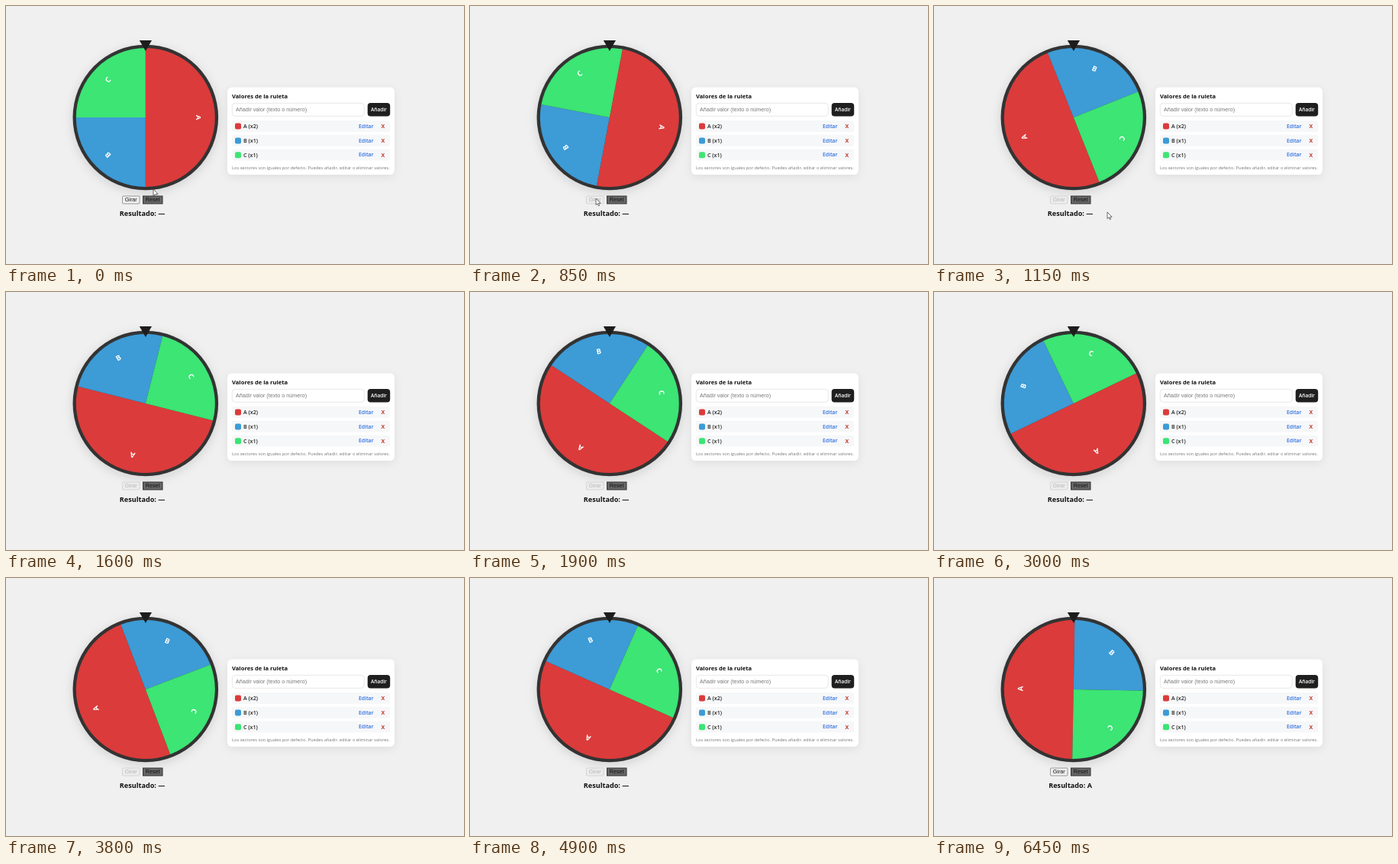
These frames come from a looping animation (600x338 px, 6.5 s). An HTML page:

```html
<!DOCTYPE html>
<html lang="es">
<head>
<meta charset="utf-8">
<title>Ruleta</title>
<style>
  html, body { margin: 0; width: 100%; height: 100%; overflow: hidden; background: #f0f0f0; }
  svg { display: block; width: 600px; height: 338px; }
  text { font-family: "Open Sans", "Noto Sans", sans-serif; fill: #111; }
  .ui { font-family: "Liberation Sans", Arial, sans-serif; font-size: 7.2px; }
  .mid { text-anchor: middle; }
  .bold { font-weight: 700; }
  .semi { font-weight: 600; }
  .label { font-size: 9.5px; fill: #fff; }
  .item { font-size: 7.1px; fill: #222; }
  .edit { font-size: 6.8px; fill: #2f6fe0; }
  .del { font-size: 7px; fill: #c0392b; }
  .disc { filter: drop-shadow(0 3px 7px rgba(0, 0, 0, .13)); }
  .card { filter: drop-shadow(0 3px 6px rgba(0, 0, 0, .07)); }
  .spin rect { fill: #efefef; stroke: #858585; }
  .spin.off rect { fill: #ececec; stroke: #cfcfcf; }
  .spin.off text { fill: #b4b4b4; }
</style>
</head>
<body>
<svg viewBox="0 0 600 338">
  <circle class="disc" cx="182.8" cy="146" r="95.3" fill="#333"/>
  <g transform="translate(182.8 146)"><g id="wheel"></g></g>
  <path d="M174.8 45H191L182.9 59Z" fill="#1d1d1d"/>

  <g class="spin" id="spin">
    <rect x="152.5" y="249" width="22.5" height="10" rx="1" stroke-width=".8"/>
    <text class="ui mid" x="163.7" y="256.4">Girar</text>
  </g>
  <rect x="179.5" y="249" width="25.5" height="10" fill="#666" stroke="#333"/>
  <text class="ui mid" x="192.2" y="256.4">Reset</text>
  <text id="result" class="bold mid" x="178.6" y="275" font-size="9.1"></text>

  <rect class="card" x="290" y="106.5" width="219" height="114.5" rx="6" fill="#fff"/>
  <text class="bold" x="296" y="121" font-size="7.6">Valores de la ruleta</text>
  <rect x="296.3" y="127.3" width="173" height="17" rx="4" fill="#fff" stroke="#ddd" stroke-width=".7"/>
  <text class="ui" x="301" y="138.3" style="fill:#777">Añadir valor (texto o número)</text>
  <rect x="473.7" y="127" width="29.5" height="17.6" rx="4" fill="#1f1f1f"/>
  <text class="semi mid" x="488.4" y="138.3" font-size="6.5" style="fill:#fff">Añadir</text>
  <g id="list"></g>
  <text x="296" y="213.6" font-size="5.72" style="fill:#777">Los sectores son iguales por defecto. Puedes añadir, editar o eliminar valores.</text>

  <path id="cursor" d="M0 0V8.6L2 6.8L3.4 9.8L4.7 9.2L3.4 6.3H6.1Z" fill="#fff" stroke="#333" stroke-width=".7"/>
</svg>
<script>
const LOOP = 6500, STEP = 50;
const SPIN_ON = 800, SPIN_OFF = 6300;
const RADIUS = 91, LABEL_RADIUS = 66.2;
const END_ANGLE = 3421;

const sectors = [
  { name: "A", weight: 2, color: "#db3b3b" },
  { name: "B", weight: 1, color: "#3d9bd6" },
  { name: "C", weight: 1, color: "#3ce574" }
];

// [time, cube root of the angle still to travel]
const spinStops = [
  [844, Math.cbrt(END_ANGLE)], [1150, 14.265], [1600, 13.078],
  [2200, 11.508], [3000, 9.423], [3800, 7.255], [6300, 0]
];
const cursorX = [[0, 193], [600, 165], [850, 165], [1150, 227], [1450, 238]];
const cursorY = [[0, 240], [600, 252], [850, 252], [1150, 270], [1450, 332]];

const $ = id => document.getElementById(id);

function track(stops, t) {
  if (t <= stops[0][0]) return stops[0][1];
  for (let i = 1; i < stops.length; i++) {
    const [t0, a] = stops[i - 1], [t1, b] = stops[i];
    if (t <= t1) return a + (b - a) * (t - t0) / (t1 - t0);
  }
  return stops[stops.length - 1][1];
}

function point(deg) {
  const rad = deg * Math.PI / 180;
  return `${RADIUS * Math.cos(rad)} ${RADIUS * Math.sin(rad)}`;
}

function build() {
  let slices = "", labels = "", rows = "", from = -90;
  sectors.forEach(({ name, weight, color }, i) => {
    const to = from + weight * 90, y = 150 + i * 18.8;
    slices += `<path d="M0 0L${point(from)}A${RADIUS} ${RADIUS} 0 0 1 ${point(to)}Z" fill="${color}"/>`;
    labels += `<text class="label bold mid" y="${-LABEL_RADIUS}" transform="rotate(${(from + to) / 2 + 90})">${name}</text>`;
    rows += `<g transform="translate(0 ${y})">
      <rect x="296" width="207" height="15" rx="3" fill="#f6f7f8"/>
      <rect x="300" y="3.6" width="8" height="8" rx="2" fill="${color}"/>
      <text class="item semi" x="311" y="10.1">${name} (x${weight})</text>
      <text class="edit semi" x="462" y="9.8">Editar</text>
      <text class="del bold mid" x="493.8" y="10">X</text></g>`;
    from = to;
  });
  $("wheel").innerHTML = slices + labels;
  $("list").innerHTML = rows;
}

function draw(t) {
  const angle = END_ANGLE - track(spinStops, t) ** 3;
  $("wheel").setAttribute("transform", `rotate(${angle})`);
  $("spin").classList.toggle("off", t >= SPIN_ON && t < SPIN_OFF);
  $("result").textContent = "Resultado: " + (t < SPIN_OFF ? "—" : "A");
  $("cursor").setAttribute("transform", `translate(${track(cursorX, t)} ${track(cursorY, t)})`);
  $("cursor").style.display = t < 1500 ? "" : "none";
}

build();
const start = performance.now();
function tick() {
  const t = (performance.now() - start) % LOOP;
  draw(Math.floor(t / STEP) * STEP);
  requestAnimationFrame(tick);
}
tick();
</script>
</body>
</html>
```
